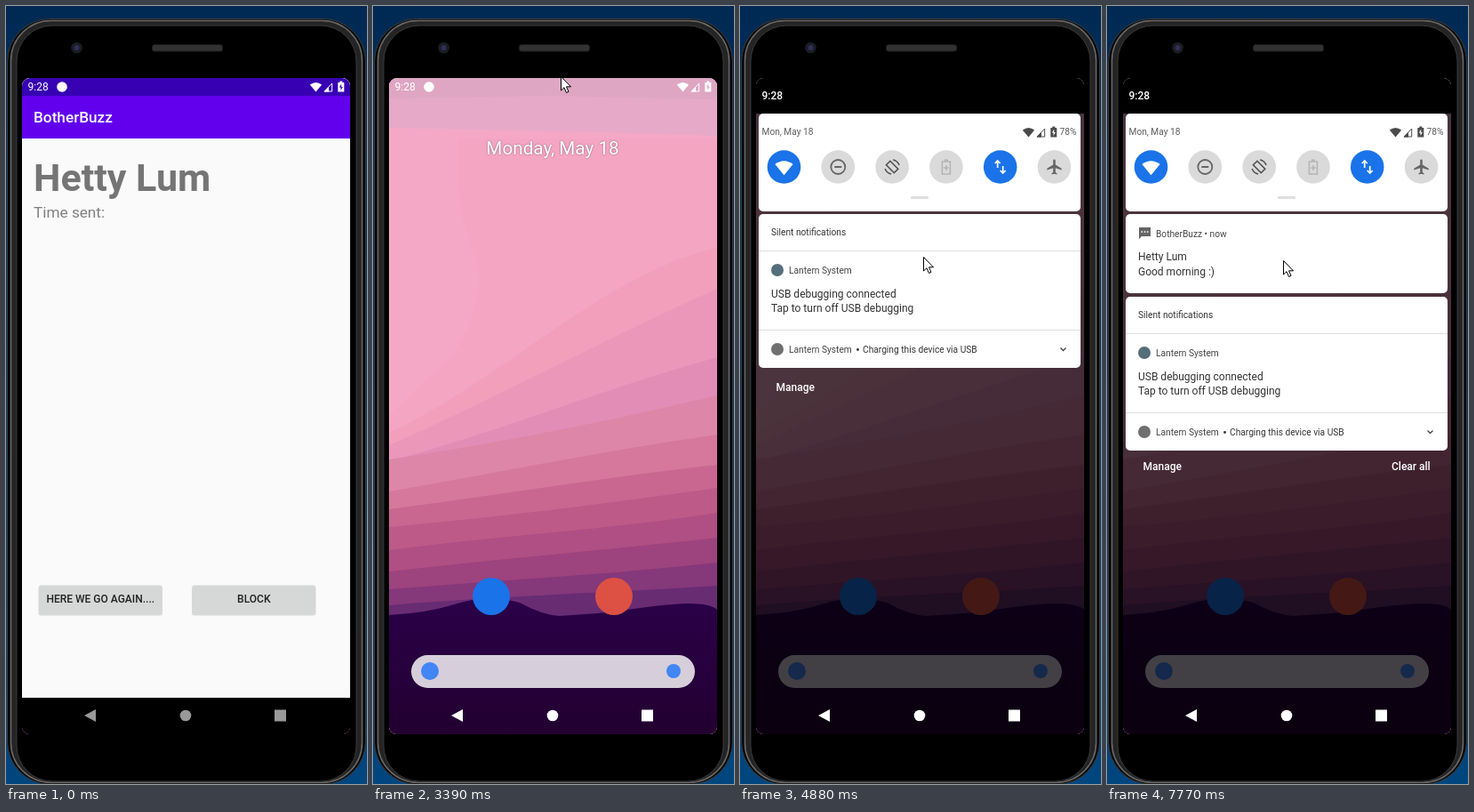
These frames come from a looping animation (406 by 875 pixels, 8 s). An HTML page:

```html
<!DOCTYPE html>
<html lang="en">
<head>
<meta charset="utf-8">
<title>Phone notification</title>
<style>
html, body { margin: 0; width: 100%; height: 100%; overflow: hidden; background: #00305c; }
svg { display: block; }
text { font-family: Roboto, sans-serif; font-size: 12px; white-space: pre; }
.med { font-weight: 500; }
.small { font-size: 10.2px; }
.line { fill: none; stroke: currentColor; }
</style>
</head>
<body>
<svg id="stage" width="406" height="875" viewBox="0 0 406 875">
  <defs>
    <linearGradient id="desk" x2="0" y2="1"><stop stop-color="#002a54"/><stop offset="1" stop-color="#00467f"/></linearGradient>
    <linearGradient id="hill" x2="0" y2="1"><stop stop-color="#2b0049"/><stop offset="1" stop-color="#220030"/></linearGradient>
    <clipPath id="screen"><rect x="18" y="81" width="369" height="738" rx="9"/></clipPath>
    <clipPath id="btn"><rect x="37" y="651.5" width="138.5" height="32" rx="2"/></clipPath>
    <path id="fan" d="M0 5.5L-6.7-2.6Q0-7.6 6.7-2.6Z" fill="currentColor"/>
    <g id="signals">
      <use href="#fan" x="348.5" y="91"/>
      <path class="line" d="M358 96H366.7V87Z"/>
      <path d="M357.5 96.4L363 91V96.4Z" fill="currentColor"/>
      <path fill="currentColor" fill-rule="evenodd" d="M373.3 86h2v-1.5h3v1.5h2v10.6h-7zM377.2 87.6l-2.3 4h1.6v3.5l2.3-4.1h-1.6z"/>
    </g>
  </defs>

  <!-- phone body -->
  <rect width="406" height="875" fill="url(#desk)"/>
  <rect x="1.5" y="14.5" width="403" height="861" rx="48" fill="#090909" stroke="#3c3c3c"/>
  <rect x="5.5" y="16.5" width="395" height="857" rx="45" fill="#242424" stroke="#6a6a6a" stroke-width="1.5"/>
  <rect x="12" y="22" width="382" height="850" rx="40" fill="#000" stroke="#3a3a3a"/>
  <circle cx="79.500" cy="47" r="6.300" fill="#1b1b22"/>
  <circle cx="79.500" cy="47" r="3" fill="#30305a"/>
  <rect x="164.500" y="43.500" width="79" height="7.500" rx="2.500" fill="#323232" stroke="#1c1c1c"/>

  <g clip-path="url(#screen)">
    <g id="wall">
      <rect x="18" y="81" width="369" height="738" fill="#f4a8c6"/>
      <path d="M95 149Q92 230 112 275T92 390L18 460V520H387V149Z" fill="#f4a5c2"/>
      <path d="M18 81H387V146L260 142 18 137Z" fill="#e7a9c8"/>
      <path d="M18 81H387V105L200 101 18 104Z" fill="#dea6c2"/>
    </g>

    <g id="home">
      <text x="202" y="167" text-anchor="middle" fill="#fff" style="font-size:20.7px;text-shadow:0 0 2px #0007">Monday, May 18</text>
      <circle cx="133" cy="664" r="21" fill="#1a73e8"/>
      <circle cx="271" cy="664" r="21" fill="#dd5144"/>
      <rect x="43" y="730" width="319" height="37" rx="18.500" fill="#d6cfdb"/>
      <circle cx="64" cy="748" r="10" fill="#4285f4"/>
      <circle cx="338" cy="748" r="8" fill="#4285f4"/>
    </g>

    <rect id="navBack" x="18" y="778" width="369" height="41"/>
    <g id="app">
      <rect x="18" y="81" width="369" height="697" fill="#fafafa"/>
      <rect x="18" y="101" width="369" height="48" fill="#6200ee"/>
      <rect x="18" y="81" width="369" height="20" fill="#3700b3"/>
      <text class="med" x="31" y="131" fill="#fff" style="font-size:17.2px">BotherBuzz</text>
      <text x="31" y="208" fill="#757575" style="font-size:43px;font-weight:700">Hetty Lum</text>
      <text x="31" y="238" fill="#808080" style="font-size:17.2px">Time sent:</text>
      <g id="buttons"></g>
      <circle id="ripple" cx="140" cy="678" clip-path="url(#btn)"/>
    </g>

    <rect id="scrim" x="18" y="81" width="369" height="738"/>

    <g id="nav" fill="#fff">
      <path d="M88 798L101 791V805Z"/>
      <circle cx="202" cy="798" r="6.300"/>
      <rect x="302" y="791.500" width="13" height="13"/>
    </g>
    <g fill="#fff" color="#fff">
      <text x="24.500" y="95">9:28</text>
      <circle cx="63" cy="91" r="5.800"/>
      <use href="#signals"/>
    </g>

    <g id="shade">
      <g id="panel">
        <rect x="18" y="-60" width="369" height="181"/>
        <text class="med" x="24.500" y="105" fill="#fff">9:28</text>
        <rect x="21" y="121" width="362" height="110" rx="5" fill="#fff"/>
        <text class="small" x="24.500" y="145" fill="#5c5c5c">Mon, May 18</text>
        <use href="#signals" x="-24" y="51" color="#4a4a4a"/>
        <text class="small" x="378.500" y="145" text-anchor="end" fill="#5c5c5c">78%</text>
        <g id="tiles"></g>
        <rect x="192" y="214" width="20" height="3" rx="1" fill="#dfdfdf"/>
      </g>

      <svg id="newCard" width="406" y="234">
        <rect x="21" width="362" height="100%" rx="5" fill="#fff"/>
        <path d="M36 15H49V25H39L36 28Z" fill="#666"/>
        <path d="M38.500 20H46.500" stroke="#fff" stroke-width="1.600" stroke-dasharray="1.600 1.600"/>
        <text class="small" x="55" y="26" fill="#444">BotherBuzz • now</text>
        <text x="35" y="52" fill="#333">Hetty Lum</text>
        <text x="35" y="69" fill="#333">Good morning :)</text>
      </svg>

      <svg id="card" width="406">
        <rect x="21" width="362" height="100%" rx="5" fill="#fff"/>
        <g id="shelf" fill="#546e7a">
          <circle cx="41" cy="13.500" r="6"/>
          <circle cx="60" cy="13.500" r="1.700"/>
        </g>
        <g id="details" fill="#333">
          <text class="small" x="35" y="24">Silent notifications</text>
          <path d="M21 41.500H383M21 130.500H383" stroke="#dedede"/>
          <circle cx="42" cy="63" r="7" fill="#546e7a"/>
          <text class="small" x="55" y="67" fill="#444">Lantern System</text>
          <text x="35" y="94">USB debugging connected</text>
          <text x="35" y="110">Tap to turn off USB debugging</text>
          <circle cx="42" cy="152" r="7" fill="#707070"/>
          <text class="small" x="55" y="156" fill="#444">Lantern System</text>
          <circle cx="132.500" cy="152.500" r="1.400"/>
          <text class="small" x="138" y="156">Charging this device via USB</text>
          <path d="M360.500 150.500L363.500 153.500 366.500 150.500" fill="none" stroke="#444" stroke-width="1.300"/>
        </g>
      </svg>
      <text id="manage" class="med" x="40.500" fill="#fff">Manage</text>
      <text id="clear" class="med" x="320" fill="#fff">Clear all</text>
    </g>
  </g>

  <g id="cursor">
    <circle id="ring" cx="1.500" cy="2" r="10" fill="#fff3" stroke="#222" stroke-width="2.400"/>
    <circle id="ringLight" cx="1.500" cy="2" r="9.700" fill="none" stroke="#fff"/>
    <path d="M.5 .5V16L4 12.700 6.500 18.500 9 17.400 6.500 11.800H11.500Z" fill="#fff" stroke="#000"/>
  </g>
</svg>

<script>
const LOOP = 8000;
const $ = id => document.getElementById(id);
const set = (id, attrs) => {
  for (const k in attrs) $(id).setAttribute(k, attrs[k]);
};
const clamp = v => Math.min(1, Math.max(0, v));
const part = (t, a, b) => clamp((t - a) / (b - a));
const out = v => 1 - (1 - v) ** 3;
const smooth = v => v * v * (3 - 2 * v);
const move = y => `translate(0 ${y})`;

// Sky bands: colour and heights at the left, two inner points and the right
const bands = [
  ['#f19fbb', 480, 425, 300, 272],
  ['#ea97ba', 494, 440, 375, 318],
  ['#e18db6', 512, 480, 430, 395],
  ['#de86a8', 510, 492, 468, 438],
  ['#d5789c', 546, 525, 500, 482],
  ['#c96791', 566, 550, 530, 516],
  ['#bd5a88', 586, 575, 560, 542],
  ['#b04f84', 612, 595, 590, 570],
  ['#9d437d', 636, 622, 612, 598],
  ['#85387a', 656, 646, 640, 626],
  ['#682c73', 674, 664, 660, 652]
];
for (const [fill, a, b, c, d] of bands)
  $('wall').innerHTML += `<path fill="${fill}" d="M18 ${a}C140 ${b} 260 ${c} 387 ${d}V819H18Z"/>`;
$('wall').innerHTML += `<path fill="url(#hill)"
  d="M18 685Q60 683 95 672T165 671Q190 685 210 686L265 682Q330 672 355 672T387 679V819H18Z"/>`;

[[37, 'HERE WE GO AGAIN....'], [209.5, 'BLOCK']].forEach(([x, label]) => {
  $('buttons').innerHTML += `<rect x="${x - .5}" y="652.5" width="139.5" height="33" rx="2.5" fill="#0002"/>
    <rect x="${x}" y="651.5" width="138.5" height="32" rx="2" fill="#d6d7d7"/>
    <text class="med" x="${x + 69.3}" y="671" text-anchor="middle" fill="#222">${label}</text>`;
});

const tiles = [
  ['#1a73e8', '#fff', '<use href="#fan" transform="translate(0 1) scale(1.5)"/>'],
  ['#dadada', '#666', '<g class="line" stroke-width="1.8"><circle r="8"/><path d="M-4 0H4"/></g>'],
  ['#dadada', '#555', `<g class="line" stroke-width="1.6"><rect x="-3.2" y="-6.3" width="6.4" height="12.6" transform="rotate(-45)"/>
    <path d="M1-8Q6-7 8-2M-1 8Q-6 7-8 2"/></g>`],
  ['#dadada', '#b5b5b5', `<path class="line" stroke-width="1.6" d="M-4.500-6H4.500V8H-4.500ZM0-2V4M-3 1H3"/>
    <path fill="currentColor" d="M-2-8.500H2V-6H-2Z"/>`],
  ['#1a73e8', '#fff', '<path class="line" stroke-width="1.7" d="M-3 1V-6.500M-6-4L-3-7 0-4M3-1V6.500M0 4L3 7 6 4"/>'],
  ['#dadada', '#666', `<path fill="currentColor" transform="scale(.86) translate(-11.500 -12)"
    d="M21 16v-2l-8-5V3.500a1.500 1.500 0 0 0-3 0V9l-8 5v2l8-2.500V19l-2 1.500V22l3.500-1 3.500 1v-1.500L13 19v-5.500z"/>`]
];
tiles.forEach(([back, ink, icon], i) => {
  $('tiles').innerHTML += `<g transform="translate(${49.5 + i * 60.8} 181)" color="${ink}">
    <circle r="18.800" fill="${back}"/>${icon}</g>`;
});

// Pointer stops: time, x, y
const stops = [
  [30, 377, 563], [260, 254, 541], [690, 254, 541], [1060, 140, 678], [1480, 140, 678],
  [1980, 205, 802], [2330, 205, 802], [3020, 217, 74], [3050, 217, 65], [3200, 217, 65],
  [3390, 211, 79], [3880, 207, 279], [4030, 207, 280], [4500, 204, 285], [4830, 204, 285],
  [4880, 206, 282], [7630, 206, 282], [7770, 198, 286], [LOOP, 198, 286]
];
function pointer(t) {
  const i = Math.max(1, stops.findIndex(s => s[0] > t));
  const [a, x, y] = stops[i - 1], [b, x2, y2] = stops[i];
  const k = smooth(part(t, a, b));
  return [x + (x2 - x) * k, y + (y2 - y) * k];
}

function draw(t) {
  const [x, y] = pointer(t);
  const dragging = t >= 3415 && t < 4030 ? 1 : 0;
  set('cursor', { transform: `translate(${x} ${y})`, opacity: t < 30 ? 0 : 1 });
  set('ring', { opacity: dragging });
  set('ringLight', { opacity: dragging });

  set('ripple', {
    r: 115 * out(part(t, 1210, 1500)),
    opacity: .14 * (1 - part(t, 1450, 1700))
  });

  // App closes to the home screen
  const gone = part(t, 2315, 2440);
  set('app', { transform: move(99 * out(part(t, 2290, 2540))), opacity: 1 - gone });
  set('navBack', { opacity: 1 - gone });
  set('nav', { opacity: .6 + .4 * gone });
  const arrive = out(part(t, 2340, 2700));
  set('home', { opacity: arrive, transform: move(20 * (1 - arrive)) });

  // Shade follows the drag, then opens fully
  const pull = t < 3390 ? 0 : clamp((y - 79) / 200);
  const open = t < 3390 ? 0 : part(t, 3910, 4010);
  const grow = out(part(t, 3960, 4700));
  const push = smooth(part(t, 6590, 7000));
  const drop = -179 + 125 * pull + 54 * open;
  set('shade', { opacity: t < 3390 ? 0 : 1 });
  set('scrim', { opacity: .27 * pull + .42 * grow });
  set('panel', { transform: move(drop) });
  set('card', { y: 232 + 2 * open + drop + 93 * push, height: 28 + 145 * grow });
  set('shelf', { opacity: 1 - part(grow, 0, .4) });
  set('details', { opacity: part(grow, .2, .8) });
  set('newCard', { height: 89 * push, opacity: part(t, 6650, 7100) });
  set('manage', { y: 433 - 60 * (1 - grow) + 89 * push, opacity: part(grow, .6, 1) });
  set('clear', { y: 433 + 89 * push, opacity: part(t, 6750, 7130) });
}

let start;
function tick(now) {
  start ??= now;
  draw((now - start) % LOOP);
  requestAnimationFrame(tick);
}
draw(0);
requestAnimationFrame(tick);
</script>
</body>
</html>
```
